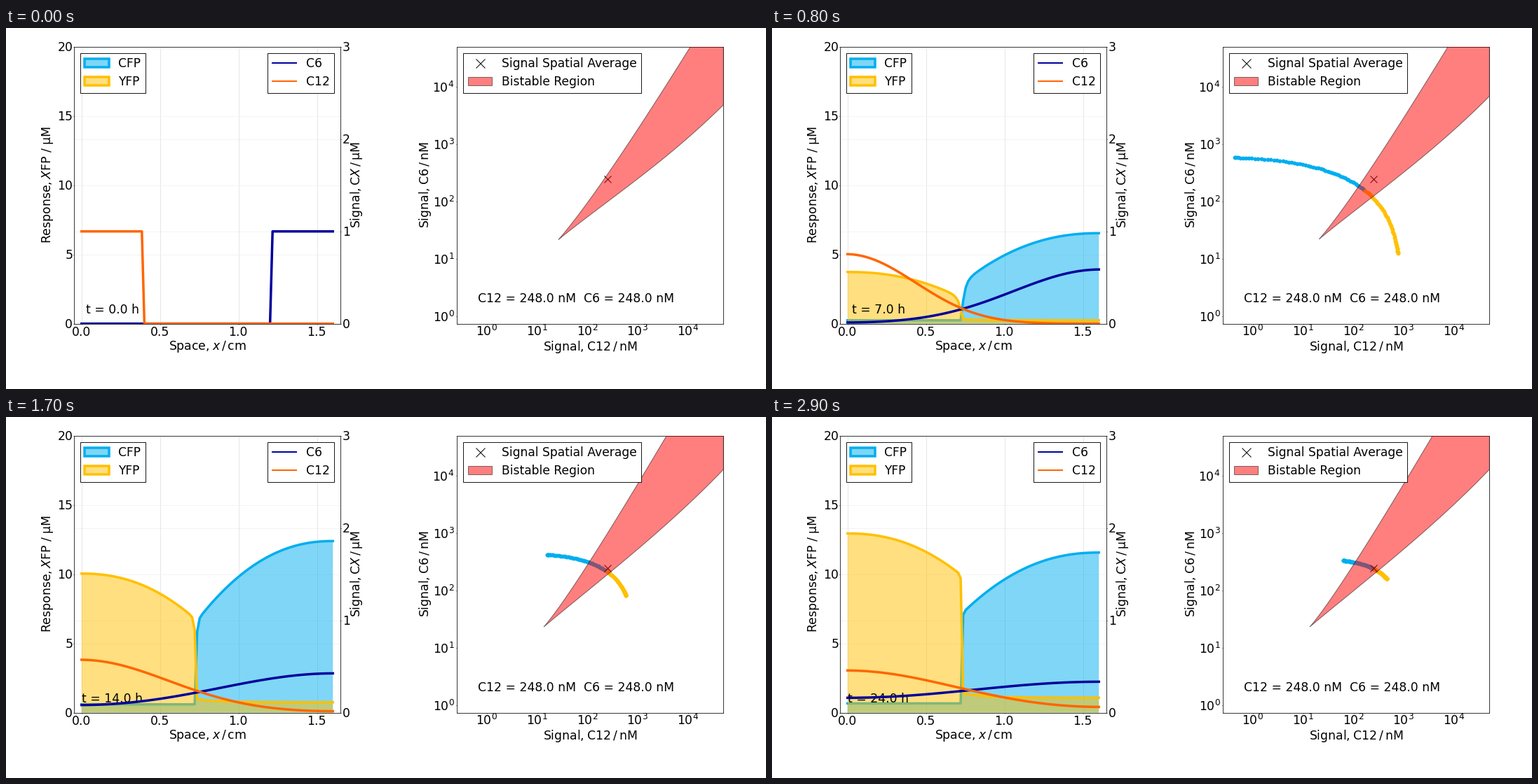
Recreate the animation shown at these times as a matplotlib script. Size 1084 px wide and 516 px high, loop 3000 ms.

```python
import numpy as np
import matplotlib.pyplot as plt
from matplotlib.animation import FuncAnimation
from matplotlib.colors import to_rgba
from matplotlib.lines import Line2D
from matplotlib.patches import Patch, Polygon

W, H, DPI = 1084, 516, 64
PX = 72 / DPI                      # points per pixel
STEPS, HOURS = 30, 24
CYAN, GOLD, NAVY, ORANGE = "#00AEEF", "#FFC000", "#00009B", "#FF6600"
TOP, BOTTOM, SPAN = 27, 422.6, 380
LEFT_X, RIGHT_X = 97, 643.3

plt.rcParams.update({
    "font.family": "DejaVu Sans", "font.size": 17.25 * PX,
    "axes.linewidth": 0.9 * PX, "axes.edgecolor": "#222222",
    "legend.fontsize": 17.1 * PX, "legend.labelspacing": 0.43,
    "legend.fancybox": False, "legend.framealpha": 1,
    "legend.edgecolor": "black", "patch.linewidth": 0.9 * PX,
})

# --- model -----------------------------------------------------------------
N = 101
x = np.linspace(0, 1.6, N)
dx = x[1] - x[0]
cell = np.arange(N)
EDGE = 46                          # first cell on the CFP side

lap = 2 * np.eye(N) - np.eye(N, k=1) - np.eye(N, k=-1)
lap[0, 0] = lap[-1, -1] = 1
lam, modes = np.linalg.eigh(lap)


def diffuse(start, rate, t):
    decay = np.exp(-rate * lam * t / dx**2)
    return np.maximum(modes @ (decay * (modes.T @ start)), 1e-9)


KEYS = np.array([0, 6, 10, 13, 17, 21, 29])
CFP_PEAK = [0, 5.57, 7.62, 10.65, 12.4, 12.45, 11.57]
CFP_EDGE = [0, 2.45, 3.9, 5.65, 6.86, 7.25, 7.4]
CFP_LOW = [0, 0.2, 0.3, 0.47, 0.6, 0.63, 0.67]
YFP_PEAK = [0, 3.1, 4.6, 7.25, 10.05, 11.65, 12.95]
YFP_EDGE = [0, 1.55, 2.65, 4.65, 7.0, 8.6, 10.15]
YFP_LOW = [0, 0.2, 0.3, 0.5, 0.75, 0.92, 1.08]
SOFTNESS = [0.6, 0.5, 0.37, 0.18, 0.12, 0.06, 0.025]


def glide(vals, n):
    """Cubic Hermite interpolation over the key steps."""
    vals = np.asarray(vals, float)
    slope = np.gradient(vals, KEYS)
    j = min(np.searchsorted(KEYS, n, "right") - 1, len(KEYS) - 2)
    h = KEYS[j + 1] - KEYS[j]
    u = (n - KEYS[j]) / h
    return ((1 + 2 * u) * (1 - u)**2 * vals[j] + u * (1 - u)**2 * h * slope[j]
            + u * u * (3 - 2 * u) * vals[j + 1] + u * u * (u - 1) * h * slope[j + 1])


def high_branch(peak, edge, s, k, soft, signal):
    body = peak - (peak - edge) * np.clip(s, 0, None)**2.2
    gate = signal**4 / (signal**4 + 0.03**4)
    return body * (1 - soft**(1 + 1.2 * np.clip(k, 0, None))) * gate


def responses(n, c6, c12):
    soft = glide(SOFTNESS, n)
    cfp_hi = high_branch(glide(CFP_PEAK, n), glide(CFP_EDGE, n),
                         (1.6 - x) / 0.85, cell - EDGE, soft, c6)
    yfp_hi = high_branch(glide(YFP_PEAK, n), glide(YFP_EDGE, n),
                         x / 0.7, EDGE - 1 - cell, soft, c12)
    cfp_lo = glide(CFP_LOW, n) + 0 * x
    yfp_lo = glide(YFP_LOW, n) * (1 + 0.3 * np.exp(-np.abs(x - x[EDGE]) / 0.15))
    right = cell >= EDGE
    cfp = np.where(right, np.maximum(cfp_hi, cfp_lo), cfp_lo)
    yfp = np.where(right, yfp_lo, np.maximum(yfp_hi, yfp_lo))
    return cfp, yfp


def bezier(*pts):
    u = np.linspace(0, 1, 50)[:, None]
    pts = [np.array(p, float) * np.ones((50, 2)) for p in pts]
    while len(pts) > 1:
        pts = [a + (b - a) * u for a, b in zip(pts, pts[1:])]
    return pts[0]


def bistable(t):
    """Outline of the wedge in axes fractions."""
    s = 1 / (1 + np.exp(7.22 - t))
    mix = lambda a, b: a + (b - a) * s
    tx, ty = mix(788, 767), mix(302.5, 300)
    roof, wall, bow = mix(976, 942), mix(110, 75), mix(58, 42)
    upper = bezier((tx, ty), (tx + bow, ty - 1.15 * bow), (roof, TOP))
    lower = bezier((tx, ty), (tx + 70, ty - mix(57, 59)),
                   (1023.3 - 85, wall + mix(84, 89)), (1023.3, wall))
    path = np.vstack([upper, [(1023.3, TOP)], lower[::-1]])
    return np.c_[(path[:, 0] - RIGHT_X) / SPAN,
                 (BOTTOM - path[:, 1]) / (BOTTOM - TOP)]


# --- stage -----------------------------------------------------------------
fig = plt.figure(figsize=(W / DPI, H / DPI), dpi=DPI, facecolor="white")


def panel(left):
    ax = fig.add_axes([left / W, 1 - BOTTOM / H, SPAN / W, (BOTTOM - TOP) / H])
    ax.set_axisbelow(True)
    return ax


def label(px, py, text, ha="center", rotation=0):
    fig.text(px / W, 1 - py / H, text, ha=ha, va="baseline",
             rotation=rotation, rotation_mode="anchor")


def bare_ticks(ax):
    ax.minorticks_off()
    ax.tick_params(length=1 * PX, width=0.8 * PX, labelbottom=False,
                   labelleft=False, labelright=False)


# left panel
ax = panel(LEFT_X)
tw = ax.twinx()
for s in tw.spines.values():
    s.set_visible(False)

cfp_fill, = ax.fill([0, 1, 1], [0, 0, 0], color=CYAN, alpha=0.5, lw=0, zorder=2)
cfp_line, = ax.plot([], [], color=CYAN, lw=3.5 * PX, zorder=2.1)
yfp_fill, = ax.fill([0, 1, 1], [0, 0, 0], color=GOLD, alpha=0.5, lw=0, zorder=2.2)
yfp_line, = ax.plot([], [], color=GOLD, lw=3.5 * PX, zorder=2.3)
c6_line, = tw.plot([], [], color=NAVY, lw=3.5 * PX)
c12_line, = tw.plot([], [], color=ORANGE, lw=3.5 * PX)
clock = ax.text((152 - LEFT_X) / SPAN, (BOTTOM - 408.5) / (BOTTOM - TOP), "",
                transform=ax.transAxes, ha="center", va="baseline", zorder=3)

ax.set(xlim=(-0.048, 1.648), ylim=(0, 20),
       xticks=[0, 0.5, 1, 1.5], yticks=[0, 5, 10, 15, 20])
tw.set(ylim=(0, 3), yticks=[0, 1, 2, 3])
ax.grid(axis="x", color="#e0e0e0", lw=0.8 * PX)
ax.grid(axis="y", color="#f0f0f0", lw=0.8 * PX)
for level in (1, 2):
    ax.axhline(level * 20 / 3, color="#f0f0f0", lw=0.8 * PX, zorder=0.5)
bare_ticks(ax)
bare_ticks(tw)

for v in (0, 0.5, 1, 1.5):
    label(LEFT_X - 0.6 + (v + 0.048) / 1.696 * SPAN, 440, f"{v:.1f}")
for v in (0, 5, 10, 15, 20):
    label(95.2, BOTTOM - v / 20 * (BOTTOM - TOP) + 6.4, str(v), ha="right")
for v in range(4):
    label(479.7, BOTTOM - v / 3 * (BOTTOM - TOP) + 6.4, str(v), ha="left")
label(287, 459.5, r"Space,$\hspace{0.25}x\,/\,$cm")
label(64.5, 224.5, r"Response,$\hspace{0.2}X$FP / μM", rotation=90)
label(505.3, 224.5, r"Signal,$\hspace{0.2}$C$X\,/\,$μM", rotation=90)


def swatch(color, name):
    return Patch(facecolor=to_rgba(color, 0.5), edgecolor=color,
                 lw=3.5 * PX, label=name)


ax.legend(handles=[swatch(CYAN, "CFP"), swatch(GOLD, "YFP")], loc="upper left")
tw.legend(handles=[Line2D([], [], color=c, lw=2 * PX, label=s)
                   for c, s in ((NAVY, "C6"), (ORANGE, "C12"))],
          loc="upper right")

# right panel
bx = panel(RIGHT_X)
bx.set(xscale="log", yscale="log", xlim=(0.25, 5e4), ylim=(0.75, 5e4))
decades = 10.0 ** np.arange(5)
bx.set_xticks(decades)
bx.set_yticks(decades)
bare_ticks(bx)

dots = dict(ls="", marker="o", ms=5.8 * PX, mew=0, zorder=2)
cfp_dots, = bx.plot([], [], color=CYAN, **dots)
yfp_dots, = bx.plot([], [], color=GOLD, **dots)
cross = dict(ls="", marker="x", color="black", mew=1 * PX)
bx.plot([248], [248], ms=10.5 * PX, zorder=3, **cross)
wedge_style = dict(facecolor="red", edgecolor="black", alpha=0.5, lw=1 * PX)
wedge = bx.add_patch(Polygon(bistable(0), transform=bx.transAxes, zorder=4,
                             **wedge_style))
bx.legend(handles=[Line2D([], [], ms=13 * PX, label="Signal Spatial Average", **cross),
                   Patch(label="Bistable Region", **wedge_style)],
          loc="upper left").set_zorder(5)

for p in range(5):
    power = f"$10^{p}$"
    label(685.5 + 71.7 * p, 440.3, power)
    label(639.5, 412.4 - 82 * p + 7.2, power, ha="right")
label(833.5, 461, r"Signal,$\hspace{0.25}$C12$\,/\,$nM")
label(603, 224.5, r"Signal,$\hspace{0.25}$C6$\,/\,$nM", rotation=90)
label(673, 392.5, "C12 = 248.0 nM  C6 = 248.0 nM", ha="left")

C12_START = (cell < 25).astype(float)
C6_START = C12_START[::-1]


def area(y):
    return np.vstack([[(x[0], 0)], np.c_[x, y], [(x[-1], 0)]])


def draw(n):
    t = n * HOURS / (STEPS - 1)
    c6 = diffuse(C6_START, 0.018, t)
    c12 = diffuse(C12_START, 0.009, t)
    cfp, yfp = responses(n, c6, c12)

    cfp_fill.set_xy(area(cfp))
    yfp_fill.set_xy(area(yfp))
    for line, y in ((cfp_line, cfp), (yfp_line, yfp), (c6_line, c6), (c12_line, c12)):
        line.set_data(x, y)
    clock.set_text(f"t = {round(t):.1f} h")

    blue = cfp > yfp
    cfp_dots.set_data(1000 * c12[blue], 1000 * c6[blue])
    yfp_dots.set_data(1000 * c12[~blue], 1000 * c6[~blue])
    wedge.set_xy(bistable(t))
    return []


anim = FuncAnimation(fig, draw, frames=STEPS, interval=100, repeat=True)
plt.show()
```
